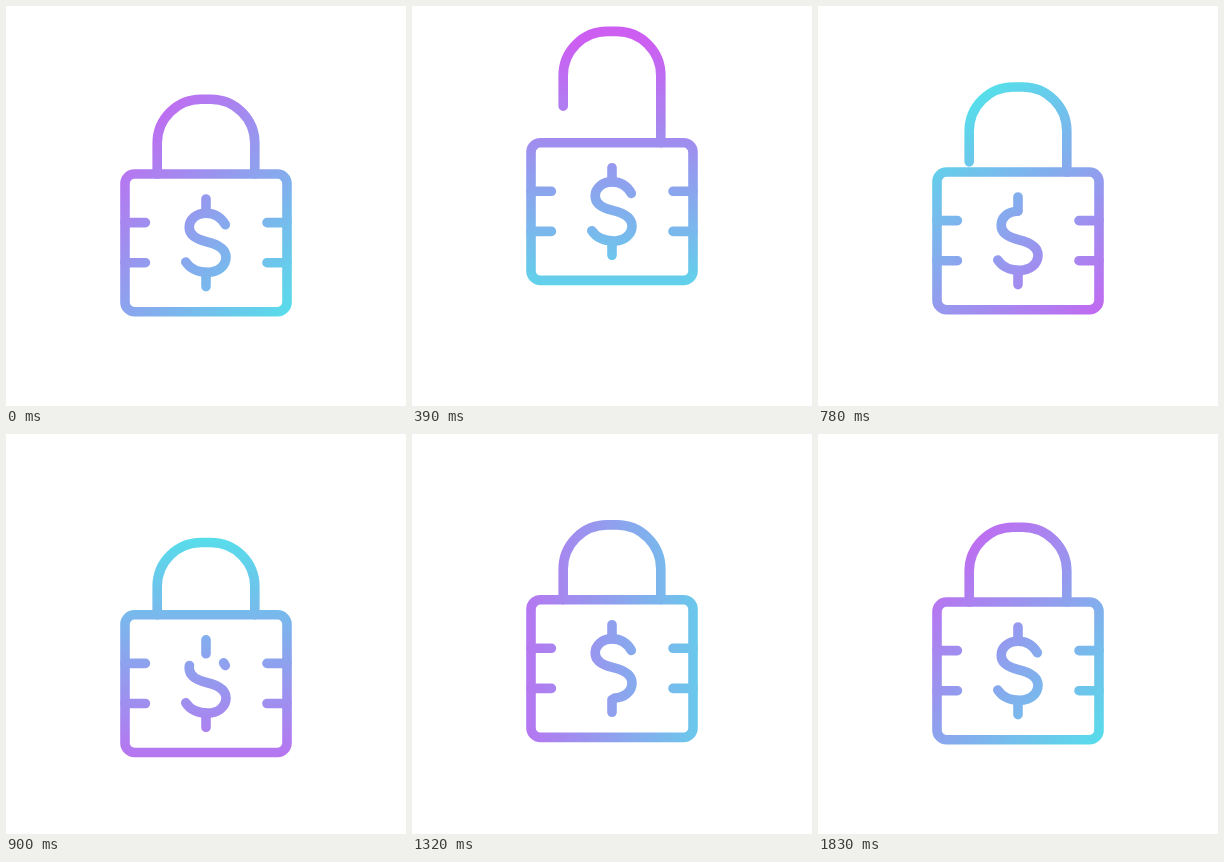
Write an HTML page that moves like this. It is 400x400 px and loops after 3.86 s.

```html
<!DOCTYPE html>
<html lang="en">
<head>
<meta charset="utf-8">
<title>Money lock</title>
<style>
  html, body { margin: 0; width: 100%; height: 100%; overflow: hidden; background: #fff; }
  svg { display: block; width: 100%; height: 100%; }
</style>
</head>
<body>
<svg viewBox="0 0 400 400">
  <defs>
    <linearGradient id="ink" gradientUnits="userSpaceOnUse">
      <stop offset="0" stop-color="#cc5ef2"/>
      <stop offset="1" stop-color="#56deea"/>
    </linearGradient>
  </defs>
  <g id="lock" fill="none" stroke="url(#ink)" stroke-width="9.6" stroke-linecap="round" stroke-linejoin="round">
    <path id="shackle"/>
    <rect x="119" y="168" width="162" height="137.7" rx="9.5"/>
    <path d="M119 216.6H139.4M119 256.7H139.4M281 216.6H261M281 256.7H261"/>
    <path d="M200 193V207M200 268V280.6"/>
    <path id="oldS" pathLength="1" stroke-dasharray="1 2"/>
    <path id="newS" pathLength="1"/>
  </g>
</svg>
<script>
const LOOP = 3860, STEP = 30, END = 1830;
const $ = id => document.getElementById(id);
const lock = $('lock'), ink = $('ink'), shackle = $('shackle'), oldS = $('oldS'), newS = $('newS');

const S = 'M219.3 218.7C215 211 208 207.2 200 207.2C190 207.2 183.2 213.5 183.2 221.3' +
  'C183.2 230 191 233.5 200.5 235.7C211 238.2 220 242 220 251.3' +
  'C220 260 212 266.3 202 266.3C192 266.3 184 262.5 179.8 256';
oldS.setAttribute('d', S);
newS.setAttribute('d', S);

// [time, value] keys
const JUMP = [[120, 0], [240, 13.5], [420, -34.5], [540, -34.5], [930, 13.5], [1200, -3.5], [1500, 0]];
const OPEN = [[250, 0], [380, -36.5], [640, -36.5], [870, 3], [990, 0]];
const SPIN = [[0, 45], [390, 90], [630, 180], [900, 270], [1320, 360], [END, 405]];

const clamp = x => Math.min(1, Math.max(0, x));
const span = (t, a, b) => clamp((t - a) / (b - a));
const sine = x => (1 - Math.cos(Math.PI * x)) / 2;

// Eased to a stop at every key
function eased(keys, t) {
  let v = keys[0][1];
  for (let i = 1; i < keys.length; i++) {
    const [a, p] = keys[i - 1], [b, q] = keys[i];
    if (t >= a) v = p + (q - p) * sine(span(t, a, b));
  }
  return v;
}

// Smooth curve through the keys, at rest on both ends
function curve(keys, t) {
  const last = keys.length - 1;
  const slope = i => i === 0 || i === last ? 0
    : (keys[i + 1][1] - keys[i - 1][1]) / (keys[i + 1][0] - keys[i - 1][0]);
  let i = 0;
  while (i < last - 1 && t > keys[i + 1][0]) i++;
  const [a, p] = keys[i], [b, q] = keys[i + 1], x = span(t, a, b), d = b - a;
  return p + (q - p) * x * x * (3 - 2 * x)
    + d * slope(i) * x * (1 - x) ** 2 - d * slope(i + 1) * x * x * (1 - x);
}

function drawInk(t) {
  const turn = curve(SPIN, t), r = turn * Math.PI / 180;
  const c = Math.cos(r), s = Math.sin(r);
  const shift = 11 * (1 - Math.cos(r - Math.PI / 4));
  const set = (n, k) => {
    ink.setAttribute('x' + n, 200 + c * k);
    ink.setAttribute('y' + n, 205 + s * k);
  };
  set(1, -135 - shift);
  set(2, 135 - shift);
}

function drawSign(t) {
  const gone = span(t, 540, 1310) ** 1.58;
  const drawn = sine(span(t, 840, 1500));
  oldS.setAttribute('stroke-dashoffset', -gone);
  oldS.style.display = gone < 1 ? '' : 'none';
  newS.setAttribute('stroke-dasharray', drawn + ' 2');
  newS.style.display = drawn > 0 ? '' : 'none';
}

function render(ms) {
  const t = Math.min(END, Math.floor((ms % LOOP) / STEP) * STEP);
  const up = eased(OPEN, t);
  lock.setAttribute('transform', `translate(0 ${eased(JUMP, t)})`);
  shackle.setAttribute('d',
    `M151.2 ${Math.min(168, 168 + up)}V${137.2 + up}a44 44 0 0 1 44 -44h9.6a44 44 0 0 1 44 44V168`);
  drawInk(t);
  drawSign(t);
}

const start = performance.now();
function tick() {
  render(performance.now() - start);
  requestAnimationFrame(tick);
}
tick();
</script>
</body>
</html>
```
